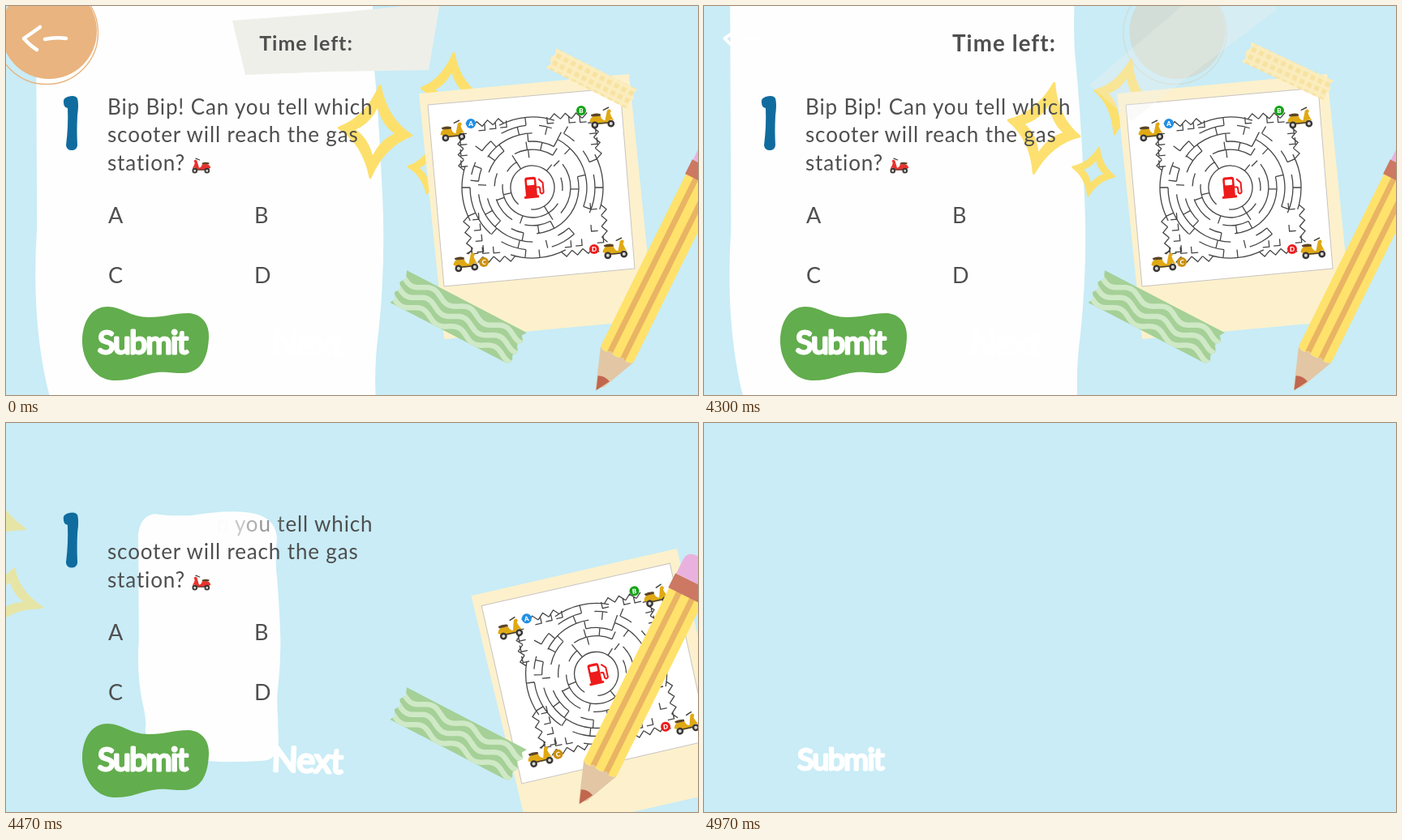
Recreate the animation shown at these times as an HTML page. Size 853 by 480 pixels, loop 5.01 s.

```html
<!DOCTYPE html>
<html lang="en">
<head>
<meta charset="utf-8">
<title>Scooter quiz</title>
<style>
html, body { margin: 0; width: 100%; height: 100%; overflow: hidden; background: #c9ecf6; }
svg { display: block; width: 100vw; height: 100vh; }
text { font-family: Lato, "Open Sans", sans-serif; fill: #4f4f4f; }
.body { font-size: 26px; letter-spacing: .85px; white-space: pre; }
.option { font-size: 27px; }
.title { font-size: 25px; font-weight: 700; letter-spacing: 1px; text-anchor: middle; }
.button { fill: #fff; stroke: #fff; stroke-width: 3; stroke-linejoin: round; text-anchor: middle; }
.badge { font-size: 8px; font-weight: 900; fill: #fff; text-anchor: middle; }
</style>
</head>
<body>
<svg viewBox="0 0 853 480" preserveAspectRatio="none">
  <defs>
    <symbol id="scooter" overflow="visible">
      <path d="M1 17Q2 11 8 10.500L15 11Q16 16 20 17L23.500 5L26.500 5.500Q27 12 31 18L27 16.500L22 21H9Z" fill="currentColor"/>
      <path d="M3 8.500Q9 6.500 15 8.500V11H4Z" fill="#5b4426"/>
      <path d="M19 4L25.500 1.500M23 20H9" fill="none" stroke="#45403a" stroke-width="1.500" stroke-linecap="round"/>
      <circle cx="26" cy="6" r="2.300" fill="currentColor"/>
      <g fill="#d8d8d8" stroke="#393633" stroke-width="2.400">
        <circle cx="7" cy="21.500" r="3.200"/><circle cx="27" cy="21.500" r="3.200"/>
      </g>
    </symbol>
    <pattern id="gingham" width="10" height="10" patternUnits="userSpaceOnUse">
      <rect width="10" height="10" fill="#f7e2a0"/>
      <path d="M0 2.500H10M2.500 0V10" stroke="#fff8dc" stroke-width="4" opacity=".5"/>
    </pattern>
    <clipPath id="strip"><path d="M0 0H167L163 6L168 12L163 19L168 26L164 33L167 39L163 45H0L4 38L-1 31L4 24L-1 17L4 10Z"/></clipPath>
  </defs>

  <g id="paper">
    <path transform="translate(250 262) scale(2.38)" fill="#fefefe" d="M-89.500-110L-90-128Q-87-154-68-155Q-48-152-22-153Q20-160 48-157Q84-153 86-125Q84-105 85-85Q88-55 89.500-20Q92 20 88 58Q85 80 87 100L88 135Q86 158 68 158Q20 161-22 157Q-50 157-68 140Q-84 130-80 112Q-81 97-84 86Q-92 50-89 5Z"/>
  </g>

  <g id="stars" fill="#fde06b" stroke="#fde06b" stroke-width="3" stroke-linejoin="round" fill-rule="evenodd"></g>

  <g id="photo">
    <path d="M509 108L768 84L799 387L540 411Z" fill="#fcf1cc"/>
    <path d="M520 122L757 101L775 324L540 346Z" fill="#fff" stroke="#c9c3c2" stroke-width="1"/>
    <path id="maze" transform="translate(649 224) rotate(-5)" fill="none" stroke="#454545" stroke-width="1.3"/>
    <g transform="translate(637 212) rotate(-5)" fill="#ee1b1b">
      <path d="M2 3Q2 0 5 0H13Q16 0 16 3V23H18V26H0V23H2Z"/>
      <rect x="4.500" y="3" width="9" height="7" rx="1" fill="#fff"/>
      <path d="M16 13H18Q20 13 20 16V20Q22 23 24 20V8L19 3" fill="none" stroke="#ee1b1b" stroke-width="2"/>
    </g>
    <g id="riders"></g>
  </g>

  <g id="circle">
    <circle cx="53" cy="31" r="59" fill="#e9b47f"/>
    <circle cx="50" cy="33" r="63.500" fill="none" stroke="#e9b47f" stroke-width="1.4"/>
  </g>
  <path id="arrow" d="M42 26Q31 34 22 40Q30 49 38 54M48 41Q61 38 74 40" fill="none" stroke="#fff" stroke-width="4.500" stroke-linecap="round" stroke-linejoin="round"/>

  <path id="tag" d="M279 18L410 8L535-4L521 79L400 81L295 85Z" fill="#efefea"/>
  <text id="title" class="title" x="370" y="55">Time left:</text>

  <g id="gridTape">
    <path transform="translate(678 52) rotate(27)" fill="url(#gingham)" d="M0 0H113L110 6L114 12L110 18L113 27H0L3 20L-1 14L3 7Z"/>
  </g>
  <g id="waveTape">
    <g transform="translate(494 326) rotate(27.5)" clip-path="url(#strip)">
      <rect x="-5" y="-5" width="180" height="55" fill="#a5d097"/>
      <path id="waves" fill="none" stroke="#cfe9c6" stroke-width="6.500"/>
    </g>
  </g>
  <g id="pencil">
    <g transform="translate(733 420) rotate(26.3)">
      <path d="M0 0Q7 6 14 0Q22 6 31 0Q38 6 45 0L26 43L18 50L15 42Z" fill="#e3c6a4"/>
      <path d="M13 34Q20 30 29 34L19 51Z" fill="#c0674e"/>
      <path d="M0-238H45V0Q38 6 31 0Q22 6 14 0Q7 6 0 0Z" fill="#ffe26c"/>
      <path d="M10-238H17V1L14 0L10 2ZM28-238H35V3L31 0L28 2Z" fill="#e9b463"/>
      <rect x="-1" y="-257" width="47" height="20" fill="#cc7862"/>
      <path d="M0-257V-277Q1-288 14-288H31Q44-288 45-277V-257Z" fill="#e9b2de"/>
    </g>
  </g>

  <path id="one" fill="#106c9e" d="M71 119Q70 114 76 112Q85 109 88 114Q90 121 88 135Q87 155 88 172Q87 178 81 178Q75 178 74 172Q77 148 76 126Q71 125 71 119Z"/>

  <g id="question">
    <text class="body" x="125" y="134">Bip Bip! Can you tell which</text>
    <text class="body" x="125" y="168">scooter will reach the gas</text>
    <text class="body" x="125" y="203">station?</text>
    <use id="moped" href="#scooter" transform="translate(253 187) scale(-.75 .75)" color="#e8332e"/>
  </g>
  <g id="options"></g>

  <path id="blob" fill="#62ad4d" d="M94 411C95 388 106 371 125 371C143 371 153 384 176 384C196 384 207 379 225 379C242 380 251 393 250 409C249 435 240 452 219 453C203 453 195 450 180 453C164 456 153 463 132 462C109 461 93 436 94 411Z"/>
  <text id="submit" class="button" x="168" y="429" font-size="39" letter-spacing="-1.6">Submit</text>
  <g id="next"><text class="button" x="371" y="431" font-size="43" letter-spacing="-1" transform="rotate(2 371 415)">Next</text></g>
</svg>

<script>
const LOOP = 5010;
const $ = id => document.getElementById(id);
const clamp = v => Math.max(0, Math.min(1, v));

function add(parent, name, attrs, text) {
  const el = document.createElementNS("http://www.w3.org/2000/svg", name);
  for (const k in attrs) el.setAttribute(k, attrs[k]);
  if (text) el.textContent = text;
  parent.append(el);
  return el;
}

// Point at distance u along the direction deg and v to its side.
function at(u, v, deg) {
  const a = deg * Math.PI / 180, c = Math.cos(a), s = Math.sin(a);
  return (u * c - v * s).toFixed(1) + " " + (u * s + v * c).toFixed(1);
}

// Ring walls with random gaps, plus stepped walls in the four corners.
function mazePath() {
  let seed = 11, d = "";
  const rnd = () => (seed = seed * 16807 % 2147483647) / 2147483647;
  const arc = (r, a, b) => { d += `M${at(r, 0, a)}A${r} ${r} 0 0 1 ${at(r, 0, b)}`; };
  for (let r = 27; r < 80; r += 10) {
    const n = Math.round(r / 2.6), step = 360 / n;
    for (let i = 0; i < n; i++) {
      const a = i * step + r;
      if (rnd() < .7) arc(r, a, a + step);
      if (rnd() < .4) d += `M${at(r, 0, a)}L${at(r + 10, 0, a)}`;
    }
  }
  for (let deg = 0; deg < 360; deg += 90) {
    arc(87, deg - 23, deg + 23);
    for (const side of [-1, 1])
      for (let k = 0; k < 4; k++) {
        const u = 78 + 9 * k, v = side * (38 - 10 * k), diag = deg + 45;
        d += `M${at(u, v, diag)}L${at(u + 9, v, diag)}`;
        if (k < 3) d += `L${at(u + 9, v - side * 10, diag)}`;
        if (rnd() < .8) d += `M${at(u, v - side * 7, diag)}h${side * 8}v-8`;
      }
  }
  return d;
}
$("maze").setAttribute("d", mazePath());

function star(rx, ry) {
  const cx = rx * .28, cy = ry * .28;
  return `M0 ${-ry}Q${cx} ${-cy} ${rx} 0Q${cx} ${cy} 0 ${ry}Q${-cx} ${cy} ${-rx} 0Q${-cx} ${-cy} 0 ${-ry}Z`;
}
for (const [x, y, rx, ry] of [[455, 155, 45, 57], [547, 105, 35, 47], [522, 201, 26, 30]])
  add($("stars"), "path", { transform: `translate(${x} ${y}) rotate(6)`, d: star(rx, ry) + star(rx * .6, ry * .6) });

const badgeColours = ["#1f8fe6", "#13a315", "#cb910f", "#ec1d1d"];
[..."ABCD"].forEach((label, i) => {
  const col = i % 2, row = i >> 1;
  const x = 533 + 184 * col + 16 * row, y = 142 - 16 * col + 161 * row;
  const bx = x + (col ? -8 : 40), by = y + (row ? 13 : 3);
  add($("riders"), "use", { href: "#scooter", transform: `translate(${x} ${y}) rotate(-5)`, color: "#e0a914" });
  add($("riders"), "circle", { cx: bx, cy: by, r: 6, fill: badgeColours[i] });
  add($("riders"), "text", { class: "badge", x: bx, y: by + 3 }, label);
  add($("options"), "text", { id: "opt" + label, class: "option", x: 126 + 180 * col, y: 268 + 74 * row }, label);
});

let waves = "";
for (let y = 10; y < 45; y += 14)
  for (let x = -6; x <= 174; x += 3)
    waves += (x < -5 ? "M" : "L") + x + " " + (y - 4.5 * Math.sin((x - 27) / 8)).toFixed(1);
$("waves").setAttribute("d", waves);

const glyphs = [];
document.querySelectorAll("#question text").forEach(line => {
  const chars = [...line.textContent];
  line.textContent = "";
  for (const c of chars) glyphs.push(add(line, "tspan", {}, c));
});
glyphs.push($("moped"));

// back: -1 is quadratic, 0 cubic, above 0 swings the other way first.
const ease = (p, back) => p * p * ((back + 1) * p - back);
const exits = [];
function leave(id, start, end, { x = 0, y = 0, turn = 0, shrink = 0, fade = 0, back = 0 }) {
  const el = $(id), box = el.getBBox();
  const cx = box.x + box.width / 2, cy = box.y + box.height / 2;
  exits.push(t => {
    const p = clamp((t - start) / (end - start)), e = ease(p, back);
    el.setAttribute("transform",
      `translate(${cx + x * e} ${cy + y * e}) rotate(${turn * e}) scale(${1 - shrink * e}) translate(${-cx} ${-cy})`);
    el.setAttribute("opacity", 1 - fade * p ** 3);
  });
}
const pop = (id, start, end, back = 0) => leave(id, start, end, { shrink: 1, back });

leave("circle", 4030, 4330, { x: 650, fade: 1, back: -1 });
leave("tag", 4080, 4330, { x: 236, turn: -46, fade: 1, back: -1 });
leave("stars", 4185, 4530, { x: -920, y: 20, turn: 178, fade: .75 });
leave("gridTape", 4260, 4450, { x: -54, y: -197, turn: -39, fade: 1, back: -1 });
leave("photo", 4330, 4640, { x: 395, y: 409, turn: -37, back: -1 });
leave("pencil", 4370, 4650, { x: 220, y: 42, back: 1.7 });
leave("waveTape", 4560, 4900, { x: 414, y: 86 });
for (const id of ["optA", "optB"]) leave(id, 4600, 4820, { x: -85, shrink: -.5, fade: 1 });
for (const id of ["optC", "optD"]) pop(id, 4650, 4800);
pop("arrow", 4230, 4370);
pop("paper", 4200, 4510, .8);
pop("title", 4250, 4460, 2.7);
pop("one", 4460, 4650, 4.5);
pop("blob", 4490, 4690, .8);
pop("next", 4780, 4940);
pop("submit", 4900, 5110);

// The question is wiped away letter by letter behind a soft edge.
function wipe(t) {
  const edge = Math.max(0, t - 4394) * .245;
  glyphs.forEach((g, i) => {
    g.setAttribute(g === $("moped") ? "opacity" : "fill-opacity", clamp((i + 8 - edge) / 7));
  });
}

const start = performance.now();
function tick() {
  const t = (performance.now() - start) % LOOP;
  for (const exit of exits) exit(t);
  wipe(t);
  requestAnimationFrame(tick);
}
tick();
</script>
</body>
</html>
```
